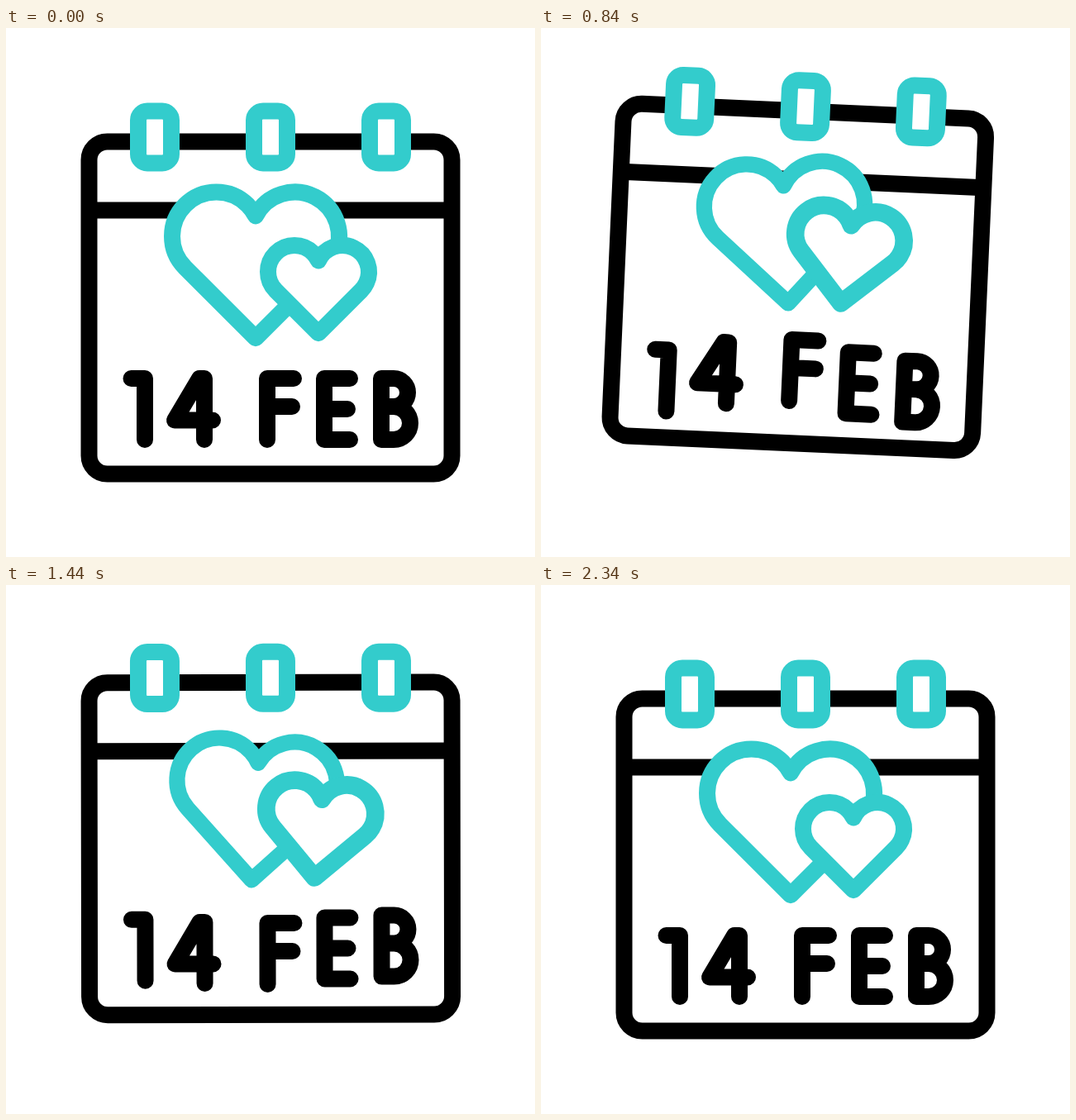
An HTML page with a canvas for the animation above (2.6 s loop, 640 by 640 pixels).

```html
<!DOCTYPE html>
<html lang="en">
<head>
<meta charset="utf-8">
<title>14 Feb calendar</title>
<style>
  html, body { margin: 0; width: 100%; height: 100%; overflow: hidden; background: #fff; }
  canvas { display: block; }
</style>
</head>
<body>
<canvas id="stage" width="640" height="640"></canvas>
<script>
const ctx = document.getElementById('stage').getContext('2d');
const LOOP = 2600;
const TEAL = '#33cccc';

// Letters are stroked with a round pen.
const LETTERS = [
  'M151.5 424H168V498',
  'M240 498V424H234L204 474.5H250',
  'M348 424H316V498M316 458H346',
  'M416 424H385V498H416M385 461H413',
  'M454 424H469a17 17 0 0 1 0 34H454M469 458a20 20 0 0 1 0 40H454V424'
].map(d => new Path2D(d));

const BIG = { x: 302, y: 252, half: 47.5, radius: 53.5, pivotY: 280 };
const SMALL = { x: 378, y: 295, half: 29, radius: 32, pivotY: 320 };

const radians = degrees => degrees * Math.PI / 180;
const alternate = i => (-1) ** i;

// Eases from rest through `count` evenly spaced peaks and back to rest.
function swing(t, start, step, count, peak) {
  const phase = (t - start) / step;
  const i = Math.floor(phase);
  const level = n => n >= 0 && n < count ? peak(n) : 0;
  const ease = (1 - Math.cos(Math.PI * (phase - i))) / 2;
  return level(i - 1) + (level(i) - level(i - 1)) * ease;
}

const bodyTurn = t => swing(t, 360, 300, 5, i => -8 * alternate(i) * Math.min(1, 2 ** (2 - i)));
const bodyLift = t => swing(t, 200, 300, 5, i => 40 * alternate(i) * 0.73 ** Math.abs(i - 1));
const letterLift = t => swing(t, 255, 202, 5, i => alternate(i) * (i < 3 ? 10 : 5));
const heartLift = t => swing(t, 200, 260, 5, i => 7 * alternate(i));
const bigTurn = t => swing(t, 350, 490, 3, i => -4.8 * alternate(i) * 0.88 ** i);

// Two beats; `dip` is the level kept between them.
const pulse = (t, dip) => swing(t, 330, 400, 3, i => i % 2 ? dip : 1);

function paint(color) {
  ctx.strokeStyle = color;
  ctx.fill();
  ctx.stroke();
}

function box(x, y, w, h, radius, color) {
  ctx.beginPath();
  ctx.roundRect(x, y, w, h, radius);
  paint(color);
}

function drawHeart({ x, y, half, radius, pivotY }, lift, turn, scale) {
  const notch = Math.acos(half / radius);
  ctx.save();
  ctx.translate(x, pivotY + lift);
  ctx.rotate(radians(turn));
  ctx.scale(scale, scale);
  ctx.translate(0, y - pivotY);
  ctx.beginPath();
  ctx.arc(-half, 0, radius, radians(135), 2 * Math.PI - notch);
  ctx.arc(half, 0, radius, Math.PI + notch, radians(405));
  ctx.lineTo(0, radius * Math.SQRT2 + half);
  ctx.closePath();
  paint(TEAL);
  ctx.restore();
}

function draw(t) {
  ctx.setTransform(1, 0, 0, 1, 0, 0);
  ctx.fillStyle = '#fff';
  ctx.fillRect(0, 0, 640, 640);
  ctx.lineWidth = 20;
  ctx.lineCap = ctx.lineJoin = 'round';

  // The calendar swings around its middle ring.
  ctx.translate(320, 132 + bodyLift(t));
  ctx.rotate(radians(bodyTurn(t)));
  ctx.translate(-320, -132);

  box(100.5, 137.5, 439, 402, 22, '#000');
  ctx.beginPath();
  ctx.moveTo(100.5, 220.5);
  ctx.lineTo(539.5, 220.5);
  ctx.lineCap = 'butt';
  ctx.stroke();
  ctx.lineCap = 'round';

  for (let x = 180; x <= 460; x += 140) box(x - 20, 100.5, 40, 63, 11, TEAL);

  drawHeart(BIG, heartLift(t), bigTurn(t), 1 - 0.045 * pulse(t, 0.2));
  drawHeart(SMALL, heartLift(t - 65), 6.2 * pulse(t, 0), 1 + 0.09 * pulse(t, 0.5));

  ctx.strokeStyle = '#000';
  LETTERS.forEach((letter, i) => {
    ctx.save();
    ctx.translate(0, letterLift(t - i * 100));
    ctx.stroke(letter);
    ctx.restore();
  });
}

function tick() {
  draw(performance.now() % LOOP);
  requestAnimationFrame(tick);
}
tick();
</script>
</body>
</html>
```
